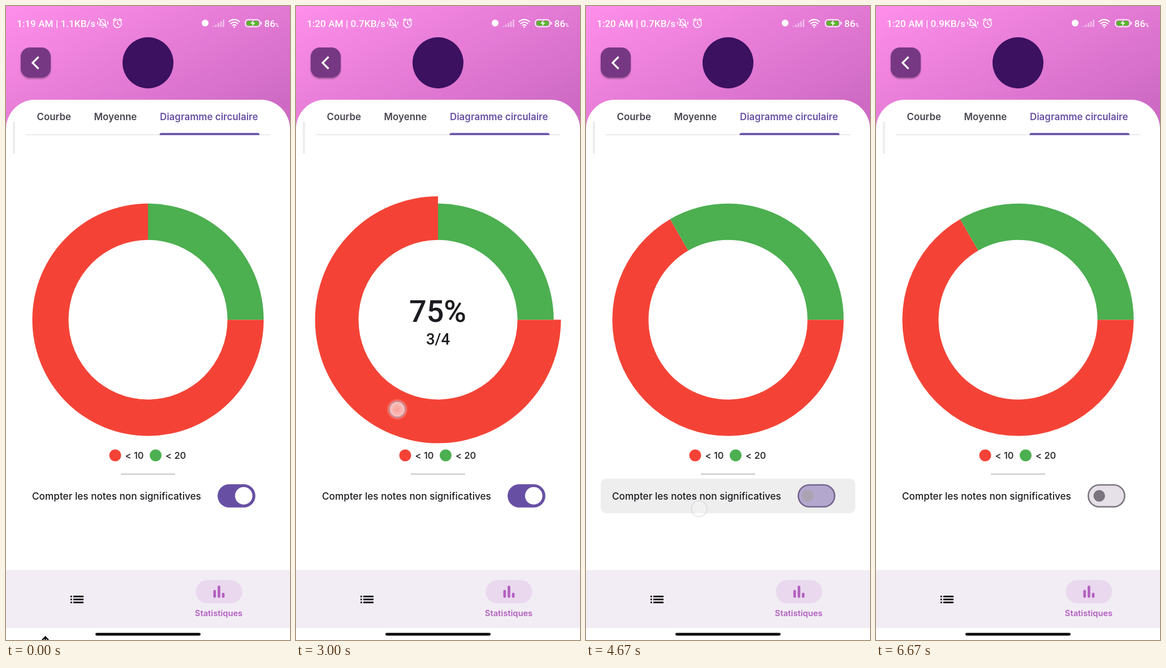
Write an HTML page that moves like this. It is 502 by 1116 pixels and loops after 6870 ms.

```html
<!DOCTYPE html>
<html lang="fr">
<head>
<meta charset="utf-8">
<style>
  html, body { margin: 0; width: 100%; height: 100%; overflow: hidden; background: #fff; }
  svg { display: block; width: 502px; height: 1116px; }
  text { font: 500 17.2px Inter, sans-serif; fill: #1d1b20; }
  .tab { font-size: 16.9px; font-weight: 600; fill: #49454f; }
  .mid { text-anchor: middle; }
  .status text { font: 500 17.2px Roboto, sans-serif; fill: #fff; }
  #percent { font: 500 54px Roboto, sans-serif; }
  #ratio { font: 500 27.5px Roboto, sans-serif; }
</style>
</head>
<body>
<svg viewBox="0 0 502 1116">
  <defs>
    <linearGradient id="sky" gradientUnits="userSpaceOnUse" x1="0" y1="0" x2="166" y2="333">
      <stop stop-color="#ff8fea"/><stop offset="1" stop-color="#ce6ac4"/>
    </linearGradient>
    <radialGradient id="halo">
      <stop offset=".72" stop-color="#fff" stop-opacity="0"/>
      <stop offset=".73" stop-color="#fff" stop-opacity=".4"/>
      <stop offset="1" stop-color="#fff" stop-opacity="0"/>
    </radialGradient>
    <radialGradient id="core">
      <stop stop-color="#fff" stop-opacity=".5"/>
      <stop offset="1" stop-color="#fff" stop-opacity=".7"/>
    </radialGradient>
    <filter id="shade" x="-20%" y="-20%" width="140%" height="150%">
      <feDropShadow dx="0" dy="2" stdDeviation="1.5" flood-opacity=".35"/>
    </filter>
  </defs>

  <rect width="502" height="240" fill="url(#sky)"/>

  <g class="status" fill="none" stroke="#fff" stroke-width="1.6" stroke-linecap="round">
    <g stroke="none">
      <text id="clock" x="19" y="36.500"></text>
      <text x="456.500" y="36.500">86</text>
      <text x="476" y="36.500" style="font-size:8.500px">%</text>
    </g>
    <path d="M165 34h12l-1.500-2v-4a4.500 4.500 0 0 0-9 0v4zM169.500 37.500h3M164 22l14 16M162 28v4M180 28v4"/>
    <circle cx="197" cy="31" r="7"/>
    <path d="M197 27v4l3 2M189.500 25l4-3M204.500 25l-4-3"/>
    <circle cx="352" cy="30" r="6" fill="#fff" stroke="none"/>
    <path d="M366.500 37v-1.500M371 37v-4M375.500 37v-7M380 37v-10M384.500 37v-13" stroke-width="2.800" stroke-linecap="butt" opacity=".5"/>
    <path d="M394.500 27.500a13 13 0 0 1 18 0M397.500 31a8.500 8.500 0 0 1 12 0M400.500 34.200a4.500 4.500 0 0 1 6 0" stroke-width="2.200"/>
    <circle cx="403.500" cy="37" r="1.500" fill="#fff" stroke="none"/>
    <rect x="423" y="24" width="26" height="12.500" rx="5"/>
    <rect x="425.300" y="26.200" width="21.400" height="8.200" rx="3" fill="#55b828" stroke="none"/>
    <path d="M451.500 28.500v3.500"/>
    <path d="M438 24.500l-6 6.500h4l-1.500 5 6-6.500h-4z" fill="#fff" stroke="none"/>
  </g>

  <rect x="26" y="73" width="53" height="53" rx="16" fill="#773983" filter="url(#shade)"/>
  <path d="M57.500 89.500L47 100l10.500 10.500" fill="none" stroke="#fff" stroke-width="3.200"/>
  <circle cx="251" cy="100" r="45" fill="#3b1160"/>

  <path d="M0 217A51 52 0 0 1 51 165H451A51 52 0 0 1 502 217V1116H0z" fill="#fff"/>
  <rect x="12" y="203" width="4" height="57" rx="2" fill="#ededef"/>
  <path d="M35 226.500H467" stroke="#e3e1e5" stroke-width="1.500"/>
  <path d="M271.500 227.300v-.8q0-3 3-3H445q3 0 3 3v.8z" fill="#6750a4"/>
  <text class="tab" x="54.500" y="201">Courbe</text>
  <text class="tab" x="155.500" y="201">Moyenne</text>
  <text class="tab" x="272" y="201" style="fill:#6750a4">Diagramme circulaire</text>

  <path id="red" fill="#f44336"/>
  <path id="green" fill="#4caf50"/>
  <text id="percent" class="mid" x="250.500" y="555.500"></text>
  <text id="ratio" class="mid" x="251" y="596"></text>

  <circle cx="193" cy="791" r="10.500" fill="#f44336"/>
  <circle cx="264.500" cy="791" r="10.500" fill="#4caf50"/>
  <text x="210.500" y="797" style="font-size:16.500px">&lt; 10</text>
  <text x="282" y="797" style="font-size:16.500px">&lt; 20</text>
  <path d="M204 824H298" stroke="#cfcdd1" stroke-width="2.500" stroke-linecap="round"/>

  <rect id="tile" x="26" y="832" width="450" height="61" rx="11" fill="#eee"/>
  <text x="46" y="868.500">Compter les notes non significatives</text>
  <rect id="track" x="375.300" y="843" width="64.200" height="38.500" rx="19.250" stroke-width="2.600"/>
  <rect id="thumb"/>

  <rect y="993" width="502" height="102" fill="#f2edf5"/>
  <path d="M119 1039.300h18M119 1044.600h18M119 1049.900h18M114 1039.300h2.700M114 1044.600h2.700M114 1049.900h2.700" stroke="#000" stroke-width="2.800"/>
  <rect x="335.500" y="1010.500" width="82" height="41" rx="20.500" fill="#e9d8ee"/>
  <path d="M368.800 1030v9.500M376.400 1022.500v17M384 1035v4.500" stroke="#b35fc0" stroke-width="4.600" stroke-linecap="round"/>
  <text class="mid" x="376" y="1073.500" style="font-size:14.700px;font-weight:600;fill:#b35fc0">Statistiques</text>
  <path id="arrow" d="M64 1116l5.500-5.500 5.500 5.500M69.500 1111v9" fill="none" stroke="#111" stroke-width="2.500"/>
  <rect x="158" y="1103.400" width="186" height="4.800" rx="2.400" fill="#000"/>

  <g id="dot">
    <circle r="19" fill="url(#halo)"/>
    <circle r="13.800" fill="url(#core)" stroke="#8c7f9a" stroke-opacity=".55" stroke-width="1.800"/>
  </g>
</svg>

<script>
const LOOP = 6870;
const $ = id => document.getElementById(id);
const clamp = v => Math.max(0, Math.min(1, v));
const ramp = (t, start, length) => clamp((t - start) / length);
const lerp = (a, b, k) => a + (b - a) * k;
const mix = (a, b, k) => `rgb(${a.map((v, i) => Math.round(lerp(v, b[i], k)))})`;
const set = (el, attrs) => { for (const k in attrs) el.setAttribute(k, attrs[k]); };

const VIOLET = [103, 80, 164], GREY = [121, 116, 126], PALE = [230, 224, 233];
const WHITE = [255, 255, 255], LILAC = [234, 221, 255];

// Finger contacts; those with a section enlarge part of the ring.
const touches = [
  { x: 195.5, y: 867, down: 1500, up: 1515 },
  { x: 195.5, y: 867, down: 1930, up: 2030 },
  { x: 179, y: 710, down: 2460, up: 3000, section: 'red' },
  { x: 358.5, y: 440, down: 3460, up: 3930, section: 'green' },
  { x: 200, y: 885, down: 4390, up: 4490 },
  { x: 277.5, y: 723, down: 4860, up: 5330, section: 'red' },
  { x: 345, y: 440, down: 5790, up: 6310, section: 'green' }
];
const taps = touches.filter(p => !p.section).map(p => p.up);

function sector(from, to, radius) {
  const at = (deg, r) => {
    const a = deg * Math.PI / 180;
    return `${(251 + r * Math.cos(a)).toFixed(2)} ${(552.3 + r * Math.sin(a)).toFixed(2)}`;
  };
  const large = to - from > 180 ? 1 : 0;
  return `M${at(from, radius)}A${radius} ${radius} 0 ${large} 1 ${at(to, radius)}` +
    `L${at(to, 140.5)}A140.5 140.5 0 ${large} 0 ${at(from, 140.5)}z`;
}

function drawRing(t, tap, isOn) {
  const change = ramp(t, tap, 150);
  const split = isOn ? lerp(240, 270, change) : lerp(270, 240, change);
  const radius = { red: 204.5, green: 204.5 };
  let percent = '', ratio = '';
  for (const { down, up, section } of touches) {
    if (!section) continue;
    radius[section] += 12.8 * (ramp(t, down + 100, 150) - ramp(t, up + 40, 150));
    if (t < down + 100 || t >= up + 40) continue;
    const total = isOn ? 4 : 3, count = section === 'red' ? total - 1 : 1;
    percent = +(count / total * 100).toFixed(2) + '%';
    ratio = `${count}/${total}`;
  }
  set($('red'), { d: sector(0, split, radius.red) });
  set($('green'), { d: sector(split, 360, radius.green) });
  $('percent').textContent = percent;
  $('ratio').textContent = ratio;
}

function drawSwitch(t, tap, isOn) {
  const k = ramp(t, tap, 300);
  const move = 1 + 2.70158 * (k - 1) ** 3 + 1.70158 * (k - 1) ** 2;
  const off = isOn ? 1 - k : k;
  const [first, last] = isOn ? [20.5, 30.7] : [30.7, 20.5];
  const stretch = clamp(k / .11), settle = 1 - (1 - ramp(k, .11, .72)) ** 3;
  const size = wide => lerp(lerp(first, wide, stretch), last, settle);
  const w = size(43.5), h = size(28.2);
  const x = isOn ? lerp(394.6, 420.2, move) : lerp(420.2, 394.6, move);
  const press = 1 - ramp(t, tap + 120, 130);
  const lit = WHITE.map((v, i) => lerp(v, LILAC[i], press));
  set($('track'), { fill: mix(VIOLET, PALE, off), stroke: mix(VIOLET, GREY, off) });
  set($('thumb'), {
    x: x - w / 2, y: 862.2 - h / 2, width: w, height: h, rx: h / 2,
    fill: mix(lit, GREY, off)
  });
}

function drawTouch(t) {
  const p = touches.find(p => t >= p.down && t < p.up + 270);
  set($('dot'), p
    ? { transform: `translate(${p.x} ${p.y})`, opacity: ramp(t, p.down, 30) * (1 - ramp(t, p.up, 270)) }
    : { opacity: 0 });
}

function draw(t) {
  const done = taps.filter(s => t >= s);
  const tap = done.length ? done[done.length - 1] : -1000;
  const isOn = done.length % 2 === 0;
  drawRing(t, tap, isOn);
  drawSwitch(t, tap, isOn);
  drawTouch(t);
  set($('tile'), { opacity: ramp(t, tap + 30, 130) * (1 - ramp(t, tap + 310, 230)) });
  set($('arrow'), { transform: `translate(0 ${8 * ramp(t, 0, 200)})`, opacity: t < 200 ? 1 : 0 });
  const speed = t < 2670 ? '1.1' : t < 6670 ? '0.7' : '0.9';
  $('clock').textContent = `1:${t < 3000 ? 19 : 20} AM | ${speed}KB/s`;
}

const start = performance.now();
function frame() {
  draw((performance.now() - start) % LOOP);
  requestAnimationFrame(frame);
}
frame();
</script>
</body>
</html>
```
